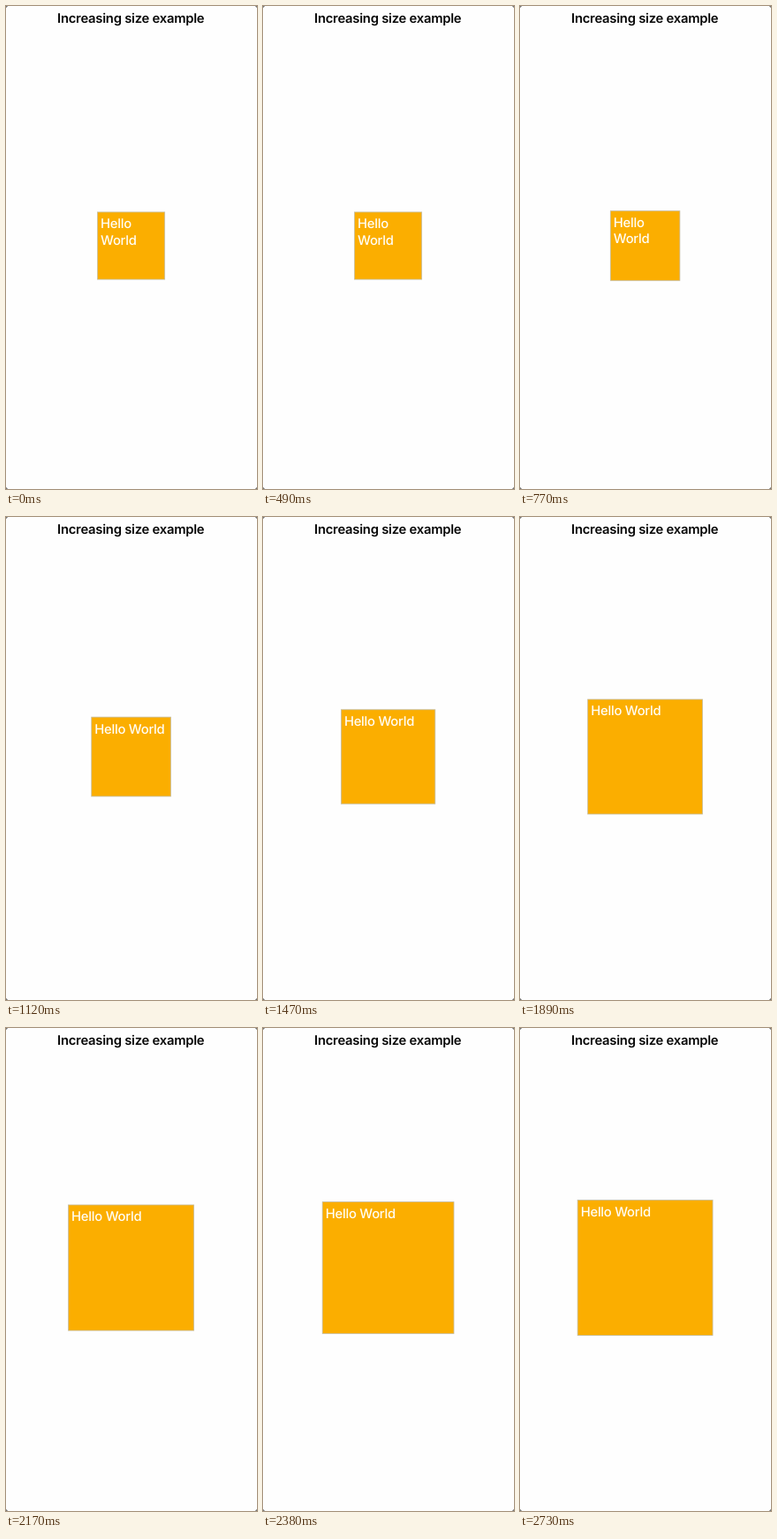
Recreate the animation shown at these times as an HTML page. Size 284 by 546 pixels, loop 2940 ms.

```html
<!DOCTYPE html>
<html lang="en">
<head>
<meta charset="utf-8">
<title>Increasing size example</title>
<style>
  html, body { margin: 0; width: 100%; height: 100%; overflow: hidden; background: #fefefe; }
  svg { display: block; width: 284px; height: 546px; }
  text { font: 500 14.8px Inter, "Liberation Sans", sans-serif; letter-spacing: -.24px; text-rendering: geometricPrecision; }
  #title { font-weight: 600; text-anchor: middle; fill: #060606; }
  #label { fill: #fffdf6; }
  #box { fill: #fbae00; stroke: #c4bda4; stroke-width: .8; }
  #corners { fill: #777; }
</style>
</head>
<body>
<svg viewBox="0 0 284 546">
  <path id="corners" d="M0 0h2.2L0 2.2zM284 0v2.2L281.8 0zM0 546v-2.2L2.2 546zM284 546h-2.2l2.2-2.2z"/>
  <text id="title" x="141.2" y="19.2">Increasing size example</text>
  <rect id="box"/>
  <g id="label">
    <text id="first">Hello</text>
    <text id="second">World</text>
  </g>
</svg>
<script>
  const LOOP = 2940, STEP = 70;
  const GROW = { start: 555, length: 2110, from: 76.1, to: 152.9 };
  const CENTER = { x: 141.6, y: 271 };
  const PAD = 3.5, BASELINE = 18.4, LINE = 18.2, WRAP_BELOW = 86.5;

  const [box, label, first, second] =
    ["box", "label", "first", "second"].map(id => document.getElementById(id));

  // cubic-bezier(.42, 0, 1, 1), solved for x by bisection
  function easeIn(x) {
    let lo = 0, hi = 1;
    for (let i = 0; i < 24; i++) {
      const s = (lo + hi) / 2, r = 1 - s;
      const bx = 1.26 * r * r * s + 3 * r * s * s + s ** 3;
      if (bx < x) lo = s; else hi = s;
    }
    return 3 * (1 - lo) * lo * lo + lo ** 3;
  }

  const easeInOut = u => u < .5 ? easeIn(2 * u) / 2 : 1 - easeIn(2 - 2 * u) / 2;

  function setAttrs(el, attrs) {
    for (const key in attrs) el.setAttribute(key, attrs[key]);
  }

  function draw(time) {
    const t = Math.floor((time % LOOP) / STEP) * STEP;
    const u = Math.min(1, Math.max(0, (t - GROW.start) / GROW.length));
    const size = GROW.from + (GROW.to - GROW.from) * easeInOut(u);
    const x = CENTER.x - size / 2, y = CENTER.y - size / 2;
    const wrapped = size < WRAP_BELOW;

    setAttrs(box, { x, y, width: size, height: size });
    setAttrs(label, { transform: `translate(${x + PAD} ${y + BASELINE})` });
    first.textContent = wrapped ? "Hello" : "Hello World";
    second.textContent = wrapped ? "World" : "";
    second.setAttribute("y", LINE);
  }

  const origin = performance.now();
  function tick() {
    draw(performance.now() - origin);
    requestAnimationFrame(tick);
  }
  tick();
</script>
</body>
</html>
```
